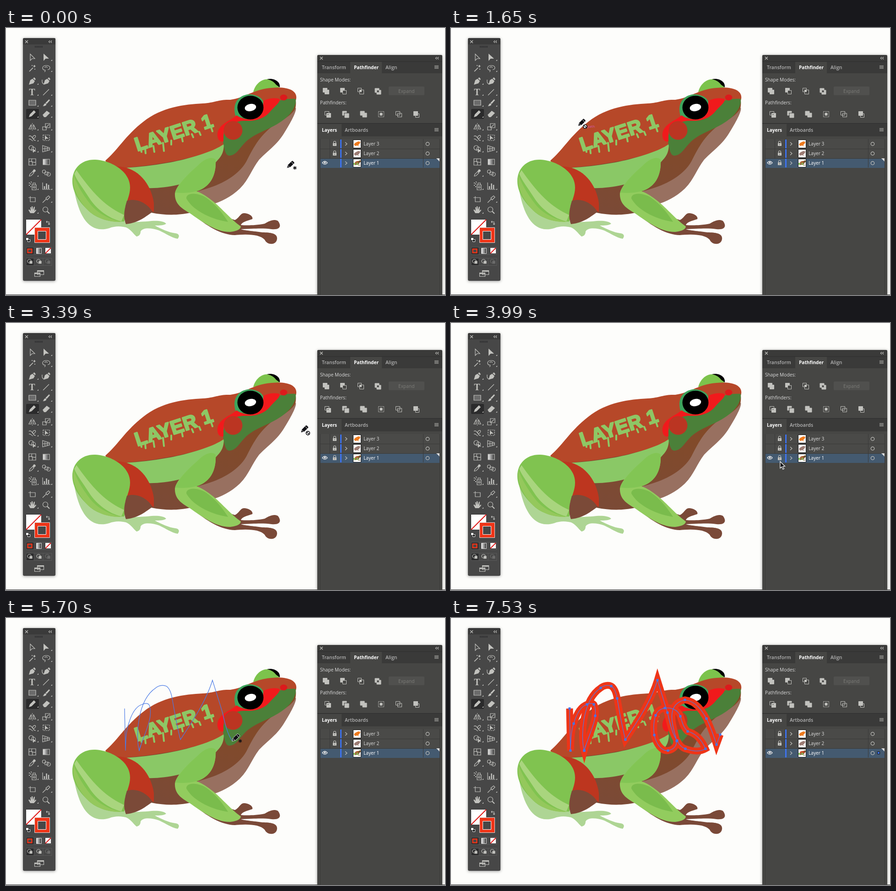
Recreate the animation shown at these times as an HTML page without scripts. Size 959 by 584 pixels, loop 7.56 s.

```html
<!DOCTYPE html>
<html lang="en">
<head>
<meta charset="utf-8">
<title>Locking a layer</title>
<style>
html, body { margin: 0; width: 100%; height: 100%; overflow: hidden; background: #fdfdfb; }
svg { display: block; width: 959px; height: 584px; }
text { font-family: "Open Sans", "Noto Sans", sans-serif; font-size: 10.2px; fill: #dcdcdc; }
.tab { font-size: 10.6px; font-weight: 600; fill: #b4b4b4; }
.on { font-size: 10.1px; font-weight: 700; fill: #fff; }
.line { fill: none; stroke: #c2c2be; stroke-width: 1.2; }
.thin { fill: none; stroke: #a6a6a2; stroke-width: 1; }
.solid { fill: #c2c2be; }
.panel { filter: drop-shadow(0 1px 3px #0006); }
</style>
</head>
<body>
<svg viewBox="0 0 959 584">
<defs>
  <linearGradient id="belly" x1=".8" y1="0" x2=".3" y2="1"><stop offset="0" stop-color="#854a24"/><stop offset="1" stop-color="#7b4a36"/></linearGradient>
  <linearGradient id="grey" x1="0" x2="1"><stop offset="0" stop-color="#eee"/><stop offset="1" stop-color="#333"/></linearGradient>

  <path id="strokeA" pathLength="1" d="M259 198L261 290C262 265 262 248 268 231C274 210 283 194 297 189C302 187 308 185 312 189C316 196 316 205 315 214C313 235 299 262 291 290"/>
  <path id="strokeB" pathLength="1" d="M294 279L291 290C283 262 286 180 327 153C334 147 344 146 350 149C357 153 361 165 363 176C368 205 374 240 381 266C408 225 438 180 451 136C460 165 466 184 473 207C478 230 484 255 494 268C499 278 505 284 512 286C527 291 542 294 556 286C547 265 533 252 517 248C508 240 505 228 501 215C496 200 480 195 467 197C455 199 450 205 447 213C442 228 442 243 444 256C448 275 460 292 474 290C486 288 493 280 493 269C488 245 464 190 511 179C535 182 548 202 558 220C567 238 574 258 580 277L588 255"/>
  <marker id="knot" markerUnits="userSpaceOnUse" markerWidth="6" markerHeight="6" refX="3" refY="3"><path fill="#4376ee" d="M.5 .5h5v5h-5z"/></marker>

  <g id="pencil">
    <path fill="#101014" stroke="#fff" stroke-width=".8" d="M-.5 .5L1.500-6.500 10-15Q11.500-16.500 13-15L15.500-12.500Q17-11 15.500-9.500L7-1.500Z"/>
    <path stroke="#fff" d="M9.500-13l4.500 5M2-5l3.500 3.500"/>
  </g>
  <g id="penStar"><use href="#pencil"/><path stroke="#101014" stroke-width="1.500" d="M17-4v8M13.500-2l7 4M20.500-2l-7 4"/></g>
  <g id="penNo"><use href="#pencil"/><circle cx="15" cy="1.500" r="4" fill="#fff" stroke="#101014" stroke-width="1.700"/><path stroke="#101014" stroke-width="1.500" d="M12-1l6 5"/></g>
  <path id="arrow" fill="#101014" stroke="#fff" stroke-width="1.200" d="M0 0V14.500L3.500 11.500 6 17 8.500 16 6 10.500H10.500Z"/>

  <g id="lock"><path class="solid" d="M-4-1h8v6h-8z"/><path class="line" d="M-2.500-1v-2a2.500 2.500 0 0 1 5 0v2"/><path stroke="#444" d="M0 1v2"/></g>
  <path id="menu" class="thin" d="M-5-3.500h9M-5-1.500h9M-5 .5h9M-5 2.500h9"/>
  <path id="cross" class="line" d="M-3-3l6 6M3-3l-6 6"/>
  <path id="fold" class="line" d="M-1-2.500l-2.500 2.500 2.500 2.500M3-2.500l-2.500 2.500 2.500 2.500"/>
  <path id="nib" class="solid" d="M-7 8l3-10 5-3 5 5-3 5zM2-6l3-2 3 4-2 2z"/>
  <path id="fly" class="solid" d="M0 0l3-3v3z"/>
  <g id="flys"><use href="#fly" x="68"/><use href="#fly" x="98"/></g>
  <g id="row">
    <path fill="#3e73ee" d="M730 1h3v19h-3z"/>
    <path class="line" d="M741 7l4 3.500-4 3.500"/>
    <path fill="#fff" stroke="#111" d="M758.500 1.500h17v18h-17z"/>
    <circle class="line" cx="921" cy="10.500" r="3.700"/>
  </g>
  <path id="blob" d="M760 12c1-3 6-6 10-7l4 1c0 3-3 6-5 7l3 3-5-2-4 1z"/>
</defs>

<path fill="#333" d="M0 583h959v1H0z"/>

<g id="art">
  <!-- body -->
  <path fill="#7cc34c" d="M540 140C544 125 555 112 572 112C588 113 596 122 597 132Z"/>
  <path d="M570 112C585 109 600 117 598 130L590 124C584 116 578 114 570 112Z"/>
  <path fill="url(#belly)" d="M255 306L476 254L633 158C636 182 620 208 605 232C590 255 570 268 553 286C538 305 530 330 512 349C494 368 465 382 430 392C410 408 360 413 318 404L296 340Z"/>
  <path fill="#987060" d="M633 174C636 182 620 210 605 234C590 257 570 270 553 288C538 307 530 332 512 350C494 368 470 380 450 386L418 357C470 345 508 322 525 292C540 262 552 240 578 218C600 203 625 192 633 174Z"/>
  <path fill="#8ac866" d="M255 306C330 303 430 285 476 252C476 266 474 275 466 285L430 325C400 340 345 352 308 350C298 332 280 314 255 306Z"/>
  <path fill="#b64829" d="M217 290C243 268 262 234 300 205C340 173 390 167 430 165C458 163 465 156 490 157C522 153 540 134 580 131C618 127 640 138 633 159L476 254C430 285 330 300 255 306C235 306 222 302 217 290Z"/>
  <!-- head -->
  <path fill="#4b8039" d="M633 155C615 154 598 156 588 165L500 203C478 215 470 238 476 258C478 270 481 281 490 279C508 276 512 255 535 240C565 220 622 208 633 163Z"/>
  <path fill="#3da45c" d="M499 176C500 155 517 144 535 145C551 147 561 154 563 164L558 188L504 198C500 190 499 184 499 176Z"/>
  <path fill="#f11a1c" d="M475 248C465 251 459 238 463 226C470 208 488 204 504 191C520 203 546 203 558 187C564 178 560 166 563 159C575 153 592 152 598 156C598 164 587 171 577 183C565 198 545 204 525 203C500 202 478 214 475 228Z"/>
  <circle cx="496" cy="224" r="20.500" fill="#bb3522"/>
  <ellipse cx="606.500" cy="152" rx="8" ry="6.500" fill="#dc1a1c"/>
  <ellipse cx="534" cy="174" rx="28.500" ry="26"/>
  <ellipse cx="534" cy="174" rx="12.500" ry="8" fill="#fff" transform="rotate(-12 534 174)"/>
  <!-- hind leg -->
  <path fill="#bd361f" d="M236 303C290 300 318 345 323 383V402L262 392Z"/>
  <path fill="#aed594" d="M149 355C160 415 183 450 225 438C240 432 252 434 262 436C272 440 278 450 285 456C292 455 294 450 294 445C300 435 320 438 335 443C350 450 360 458 375 461C380 455 378 450 370 449C355 447 340 440 325 432C335 432 345 432 350 428C345 422 330 421 318 422C300 424 285 424 262 425Z"/>
  <path fill="#80c350" d="M145 335C145 306 166 287 195 288C232 290 272 315 271 350C271 365 263 380 260 395L259 423C235 426 205 420 185 404C162 384 145 360 145 335Z"/>
  <path fill="#94c85c" d="M148 322C155 345 175 375 190 392C210 412 235 420 252 424C220 426 190 412 173 392C155 370 143 345 148 322Z"/>
  <path fill="#a9d57e" d="M154 311C166 328 185 354 205 373C225 392 243 402 258 409L252 423C225 417 197 396 182 372C168 350 154 332 149 319Z"/>
  <path fill="#7b4a38" d="M264 378C290 370 312 388 320 402C306 412 290 426 262 429C255 412 259 395 264 378Z"/>
  <!-- arm -->
  <path fill="#7a4938" d="M404 404C440 435 470 452 500 453C530 450 555 452 565 463C570 475 590 476 592 462C594 450 580 447 560 447C540 444 520 443 513 440C540 439 560 437 580 440C600 442 602 432 594 422C585 417 575 422 565 428C545 432 525 432 513 431C515 425 525 422 538 418C541 412 530 405 520 405C512 405 510 415 500 420L470 410Z"/>
  <path fill="#92cc5e" d="M458 288C450 279 432 287 420 300C400 318 372 343 369 362C368 385 385 395 400 404C430 425 460 447 490 446C505 444 513 440 513 434C500 425 485 410 470 395C455 380 432 362 416 357C440 350 460 330 458 288Z"/>
  <path fill="#82c554" d="M458 288C450 279 432 287 420 300C400 318 375 341 370 360C388 362 402 360 416 357C440 350 460 330 458 288Z"/>
  <path fill="#7abc4c" d="M394 373C393 358 424 360 441 374C460 388 475 408 485 424C455 420 410 402 394 373Z"/>
  <g transform="rotate(-18 289 270)">
    <text x="287" y="269" style="font:700 42px 'Liberation Sans',Arial,sans-serif;letter-spacing:.5px;fill:#8ec765" stroke="#8ec765" stroke-width="3" stroke-linejoin="round">LAYER 1</text>
  </g>
  <path fill="none" stroke="#8ec765" stroke-width="4" stroke-linecap="round" d="M295 266l1 5M304 264l1 10M322 258l2 13M343 251l2 18M361 246v9M384 238l2 10M406 232l3 7M422 227l3 7M448 217l3 9"/>
  <!-- finished pencil stroke -->
  <g fill="none" stroke="#ee3518" stroke-width="15" stroke-miterlimit="10" opacity="0">
    <use href="#strokeA"/><use href="#strokeB"/>
    <animate attributeName="opacity" calcMode="discrete" values="0;1" keyTimes="0;.837" dur="7.56s" repeatCount="indefinite"/>
  </g>
</g>

<!-- live stroke and its anchors -->
<g fill="none" stroke="#4a7ae6" stroke-width="1.200" stroke-dasharray="1 2">
  <use href="#strokeA" stroke-dashoffset="1"><animate attributeName="stroke-dashoffset" values="1;1;0;0" keyTimes="0;.619;.6746;1" dur="7.56s" repeatCount="indefinite"/></use>
  <use href="#strokeB" stroke-dashoffset="1"><animate attributeName="stroke-dashoffset" values="1;1;.99;0;0" keyTimes="0;.6746;.675;.837;1" dur="7.56s" repeatCount="indefinite"/></use>
</g>
<g fill="none" stroke="none" opacity="0" marker-mid="url(#knot)" marker-end="url(#knot)">
  <use href="#strokeA" marker-start="url(#knot)"/><use href="#strokeB"/>
  <animate attributeName="opacity" calcMode="discrete" values="0;1" keyTimes="0;.837" dur="7.56s" repeatCount="indefinite"/>
</g>

<!-- toolbox -->
<g>
  <rect class="panel" x="37" y="22" width="71" height="531" rx="3" fill="#474747"/>
  <path fill="#3a3a3a" d="M37 36V25q0-3 3-3h65q3 0 3 3v11z"/>
  <use href="#cross" x="45" y="30"/><use href="#fold" x="97" y="30"/>
  <path stroke="#2c2c2e" stroke-width="4" stroke-dasharray="1 1" d="M63 41h18"/>
  <rect x="44" y="177" width="28" height="22" rx="2" fill="#2b2b2c"/>
  <g class="line">
    <path d="M53 57v14l4-4h6z"/>
    <path d="M51 95l8-8M62 81v5M59.500 83.500h5M57 81v2M63 89v2" stroke-width="1.700"/>
    <path d="M83 92c-5-3-4-10 5-10 10 0 10 9 3 9M83 92c3-1 4 2 1 4M85 87c0-3 5-3 5 0"/>
    <path d="M79 113c-1 9 3 11 8 8M81 147L94 134"/>
    <path d="M50 158h15v11H50z" fill="#6b6b6b"/>
    <path d="M57.500 208v17" stroke-dasharray="2 1.500"/><path d="M55 211v10h-5zM60 211v10h5z"/>
    <path d="M86 209h10v9H86zM80 216h8v7h-8zM89 216l5-5"/>
    <path d="M50 237c6-5 7 8 12 4s2-8-2-5 0 10 5 10M50 243c4-2 6 4 9 4"/>
    <path d="M81 234h14v12H81z" stroke-dasharray="3 1.500"/>
    <circle cx="55" cy="262" r="5"/><circle cx="60" cy="265" r="4.500"/>
    <path d="M80 257v14l15-4v-5zM85 258v11M90 260v8M80 264h15"/>
    <path d="M50 286h15v14H50zM50 293c5-5 10 4 15 0M57 286c-4 5 4 9 0 14"/>
    <path d="M81 287h14v12H81z" fill="url(#grey)"/>
    <path d="M51 324l1-4 6-6 3 3-6 6z"/>
    <circle cx="83" cy="314" r="3.500"/><path d="M85 315h7v6h-7z"/><circle cx="93" cy="320" r="4"/>
    <path d="M57 343h9v11h-9zM59 343v-4h5v4"/><circle cx="61.500" cy="348" r="2"/>
    <path d="M80 338v15h17"/><path d="M84 352v-6M88.500 352v-12M93 352v-9" stroke-width="2.500"/>
    <path d="M53 368v12h11V371H49"/>
    <path d="M80 382l8-8M87 372l6-5 3 3-6 6z"/>
    <circle cx="86" cy="397" r="5.500"/><path d="M90 401l5 5" stroke-width="2"/>
    <path d="M88 424h6v6M88 424l2-2M88 424l2 2M94 430l-2-2M94 430l2-2"/>
  </g>
  <g class="solid">
    <path d="M82 56v16l4.500-5H94z"/>
    <use href="#nib" x="57" y="116"/><use href="#nib" x="89" y="116"/>
    <path d="M80 171c3-1 2-6 6-6 4 1 3 6-6 6zM86 164l8-8 2 2-7 8z"/>
    <path d="M50 195l2-6 9-9 4 4-9 9z"/>
    <path d="M80 190l9-9 7 5-9 9h-4z"/>
    <path d="M85 235v10l3-3h5zM59 264v9l3-3h4z"/>
    <path d="M58 313l3-4 3 1 1 3-4 3z"/>
    <path d="M50 338h2v2h-2zM53 340h2v2h-2zM50 343h2v2h-2zM54 336h2v2h-2zM53 346h2v2h-2z"/>
    <path d="M53 405l-4-7 2-1 3 3-1-8h2l1 6v-8h2l1 8 2-7h2l-1 9 3-3 1 2-5 6z"/>
  </g>
  <text x="57" y="147" text-anchor="middle" style="font:700 20px 'Liberation Serif',serif;fill:#c2c2be">T</text>
  <use href="#fly" x="98" y="72"/><use href="#fly" x="98" y="96"/><use href="#fly" x="68" y="124"/>
  <use href="#flys" y="148"/><use href="#flys" y="172"/><use href="#flys" y="196"/><use href="#flys" y="224"/>
  <use href="#fly" x="68" y="248"/><use href="#flys" y="272"/><use href="#fly" x="68" y="325"/>
  <use href="#flys" y="354"/><use href="#fly" x="98" y="382"/><use href="#fly" x="68" y="406"/>
  <path fill="#fff" stroke="#333" d="M43.500 418.500h34v34h-34z"/><path stroke="#e01c1c" stroke-width="2.200" d="M44 452l33-33"/>
  <path fill="#ee3518" stroke="#ddd" d="M62.500 436.500h33v33h-33z"/><path fill="#474747" stroke="#fff" d="M69.500 444.500h18v18h-18z"/>
  <path fill="#111" stroke="#eee" d="M47.500 462.500h5v5h-5z"/><path fill="#fff" stroke="#222" d="M43.500 458.500h6v6h-6z"/>
  <path fill="#2b2b2c" d="M44 479h17v17H44zM44 503h17v16H44z"/>
  <path fill="none" stroke="#5a5a5a" d="M44 479.500h56v16H44zM61 479v17M81 479v17M44 503.500h56v16H44zM61 503v16M81 503v16"/>
  <path fill="#474747" stroke="#ee3518" stroke-width="2.500" d="M47.500 483.500h9v8h-9z"/>
  <path fill="url(#grey)" stroke="#ddd" d="M66.500 481.500h11v12h-11z"/>
  <path fill="#fff" d="M86 481h12v12H86z"/><path stroke="#e01c1c" stroke-width="2" d="M86 493l12-12"/>
  <g id="mode" class="line"><circle cx="51" cy="510" r="4"/><path class="solid" d="M52 510h5v5h-5z"/></g>
  <use href="#mode" x="20"/>
  <use href="#mode" x="39" opacity=".3"><animate attributeName="opacity" calcMode="discrete" values=".3;1" keyTimes="0;.837" dur="7.56s" repeatCount="indefinite"/></use>
  <g class="line"><path fill="#474747" d="M68.500 530.500h14v9h-14zM62.500 535.500h12v8h-12z"/></g><path class="solid" d="M68 530h15v3H68zM62 535h13v3H62z"/>
</g>

<!-- right panel -->
<g>
  <path class="panel" fill="#464644" d="M680 584V62q0-3 3-3h267q3 0 3 3v522z"/>
  <path fill="#3a3a39" d="M680 99V62q0-3 3-3h267q3 0 3 3v37zM680 209h273v28H680z"/>
  <path fill="#464644" d="M752 73h69v26h-69zM680 210h53v27h-53z"/>
  <path stroke="#2e2e2e" d="M680 208.500h273M680 73.500h273"/>
  <use href="#cross" x="689" y="66"/><use href="#fold" x="942" y="66"/>
  <use href="#menu" x="941" y="86"/><use href="#menu" x="941" y="223"/>
  <text class="tab" x="690" y="90">Transform</text><text class="on" x="760" y="90">Pathfinder</text><text class="tab" x="829" y="90">Align</text>
  <text x="686" y="117">Shape Modes:</text><text x="686" y="167">Pathfinders:</text>
  <rect x="836" y="128" width="78" height="19" rx="2" fill="#50504e"/><text x="857" y="142" style="fill:#7c7c78">Expand</text>

  <g fill="#c2c2be" fill-rule="evenodd" stroke="#c2c2be">
    <path d="M692.500 131.500h9v4h4v9h-9v-4h-4z"/>
    <path d="M730.500 131.500h9v4h-4v5h-5z"/><path fill="none" d="M735.500 136.500h8v8h-8zM768.500 131.500h8v8h-8zM772.500 135.500h9v9h-9z"/>
    <path d="M772.500 135.500h4v4h-4z"/>
    <path d="M806 132h9v9h-9zM810 136h9v9h-9z"/>
    <path fill="none" d="M696.500 182.500h9v8h-9z"/><path d="M700.500 186.500h9v9h-9zM702 188h3v3h-3z"/>
    <path d="M735 182h9v3h-6v6h-3zM740 187h9v9h-9z"/>
    <path d="M774 182h9v4h5v9h-9v-4h-5z"/>
    <path fill="none" d="M813.500 182.500h12v12h-12z" stroke-dasharray="2 1"/><path d="M817 186h5v5h-5z"/>
    <path fill="none" d="M851.500 182.500h9v8h-9zM855.500 186.500h9v8h-9z"/>
    <path d="M890.500 182.500h9v9h-9z"/><path fill="none" d="M899.500 187.500h3v8h-8v-4"/>
  </g>

  <text class="on" x="690" y="227">Layers</text><text class="tab" x="740" y="227">Artboards</text>
  <path fill="#4a4a48" d="M686 243h261v42H686z"/><path fill="#445a70" d="M686 285h261v21H686z"/>
  <path fill="none" stroke="#3a3a39" d="M686.500 243v341M947.500 243v341M686 264.500h261M686 285.500h261M707.500 243v42M729.500 243v42M911.500 243v62"/>
  <use href="#row" y="243"/><use href="#row" y="264"/><use href="#row" y="285"/>
  <use href="#lock" x="718" y="253"/><use href="#lock" x="718" y="274"/>
  <use href="#lock" x="718" y="295" opacity="0"><animate attributeName="opacity" calcMode="discrete" values="0;1;0" keyTimes="0;.103;.5357" dur="7.56s" repeatCount="indefinite"/></use>
  <use href="#blob" y="243" fill="#ee7a1e"/><use href="#blob" y="264" fill="#9c7c74"/>
  <use href="#art" transform="translate(754.200 285.600) scale(.033)"/>
  <text x="781" y="257">Layer 3</text><text x="781" y="278">Layer 2</text><text x="781" y="299" style="fill:#fff">Layer 1</text>
  <path fill="none" stroke="#e4e4e4" stroke-width="1.300" d="M691 295q5.500-7 11 0q-5.500 6-11 0z"/><circle cx="696.500" cy="294.500" r="2" fill="#e4e4e4"/>
  <path fill="#ddd" d="M940 285h7v7z"/>
  <path fill="#3e73ee" stroke="#111" d="M931.500 292.500h5v5h-5z" opacity="0"><animate attributeName="opacity" calcMode="discrete" values="0;1" keyTimes="0;.837" dur="7.56s" repeatCount="indefinite"/></path>
</g>

<!-- pointer: hovering -->
<text x="298" y="218" style="font-size:7.500px;fill:#d35ab4" opacity="0">path<animate attributeName="opacity" calcMode="discrete" values="0;1;0" keyTimes="0;.21;.234" dur="7.56s" repeatCount="indefinite"/></text>
<g transform="translate(614 306)">
  <animateTransform attributeName="transform" type="translate" dur="7.56s" repeatCount="indefinite" calcMode="spline"
    values="614 306;614 306;717 297;717 297;300 216;278 214;278 214;400 170;533 144;533 144;719 303;719 303;259 198;259 198"
    keyTimes="0;.033;.079;.139;.198;.218;.234;.291;.361;.397;.489;.544;.611;1"
    keySplines=".4 0 .6 1;.4 0 .6 1;.4 0 .6 1;.4 0 .6 1;0 0 1 1;0 0 1 1;.4 0 .8 .8;.2 .2 .6 1;0 0 1 1;.4 0 .6 1;0 0 1 1;.4 0 .6 1;0 0 1 1"/>
  <use href="#penStar"><animate attributeName="opacity" calcMode="discrete" values="1;0;1;0" keyTimes="0;.06;.5565;.619" dur="7.56s" repeatCount="indefinite"/></use>
  <use href="#penNo" opacity="0"><animate attributeName="opacity" calcMode="discrete" values="0;1;0" keyTimes="0;.151;.462" dur="7.56s" repeatCount="indefinite"/></use>
  <use href="#arrow" opacity="0"><animate attributeName="opacity" calcMode="discrete" values="0;1;0;1;0" keyTimes="0;.06;.151;.462;.5565" dur="7.56s" repeatCount="indefinite"/></use>
</g>

<!-- pointer: drawing -->
<g opacity="0">
  <use href="#penStar"/>
  <animateMotion dur="7.56s" repeatCount="indefinite" calcMode="linear" keyPoints="0;0;1;1" keyTimes="0;.619;.6746;1"><mpath href="#strokeA"/></animateMotion>
  <animate attributeName="opacity" calcMode="discrete" values="0;1;0" keyTimes="0;.619;.675" dur="7.56s" repeatCount="indefinite"/>
</g>
<g opacity="0">
  <use href="#penStar"/>
  <animateMotion dur="7.56s" repeatCount="indefinite" calcMode="linear" keyPoints=".01;.01;1;1" keyTimes="0;.675;.837;1"><mpath href="#strokeB"/></animateMotion>
  <animate attributeName="opacity" calcMode="discrete" values="0;1;0" keyTimes="0;.675;.94" dur="7.56s" repeatCount="indefinite"/>
</g>
</svg>
</body>
</html>
```
